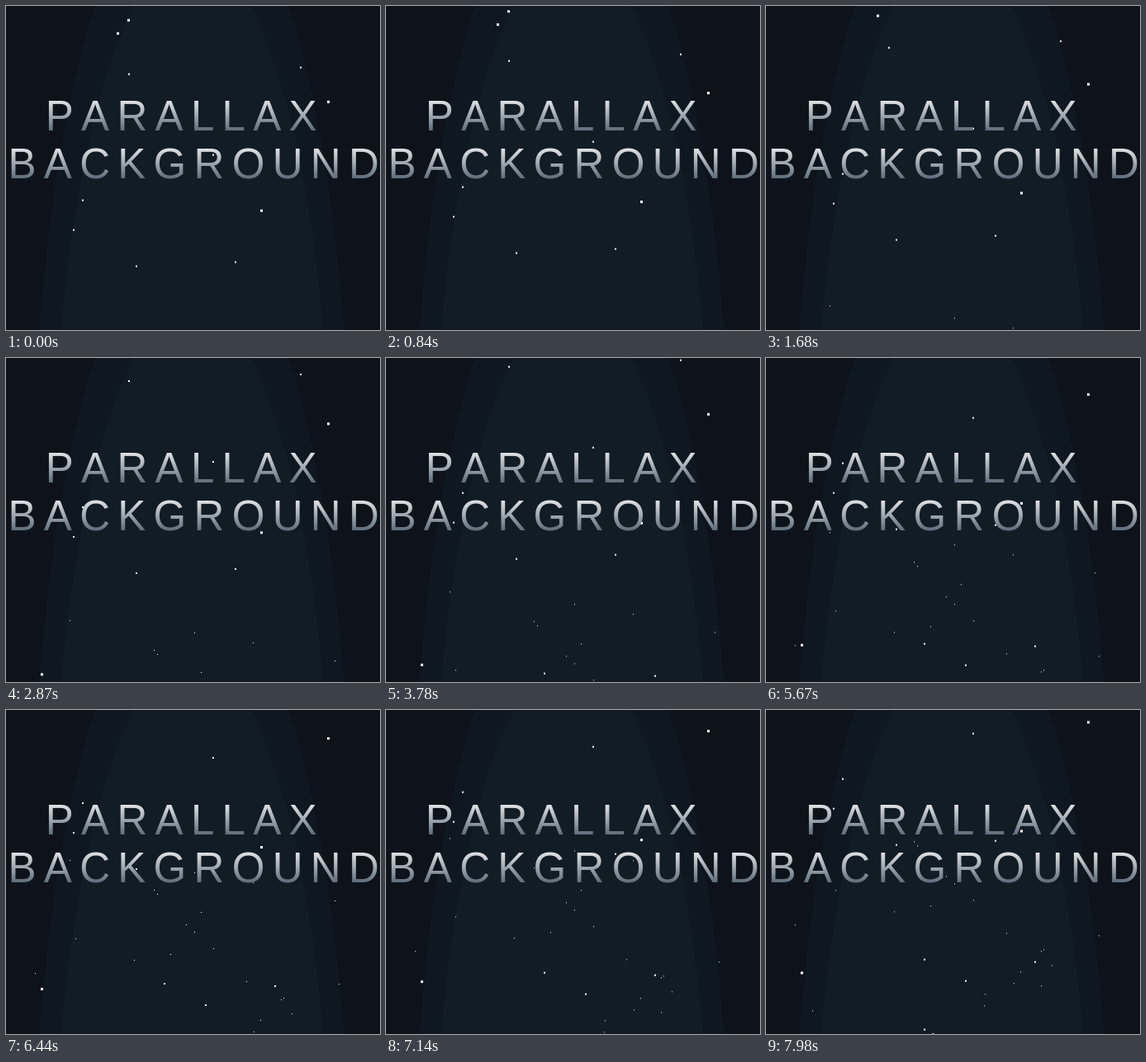
Animation, 453 px wide and 393 px high, one loop 8 s. Source, as an HTML page with a canvas:

```html
<!DOCTYPE html>
<html lang="en">
<head>
<meta charset="utf-8">
<title>Parallax background</title>
<style>
  html, body { margin: 0; width: 100%; height: 100%; overflow: hidden; background: #0e131b; }
  svg, canvas { position: absolute; left: 0; top: 0; width: 453px; height: 393px; }
  text { font: 51px "Liberation Sans", Arial, sans-serif; letter-spacing: 9.3px; font-kerning: none; fill: url(#fade); }
</style>
</head>
<body>
<svg viewBox="0 0 453 393">
  <ellipse cx="225" cy="631" rx="193.3" ry="794.5" fill="#0f1820"/>
  <ellipse cx="225.5" cy="631" rx="169" ry="694.6" fill="#121c25"/>
</svg>
<canvas width="453" height="393"></canvas>
<svg viewBox="0 0 453 393">
  <defs>
    <linearGradient id="fade" gradientUnits="userSpaceOnUse" x1="0" x2="0" y1="-45" y2="11">
      <stop stop-color="#fff"/>
      <stop offset="1" stop-color="#38495a"/>
    </linearGradient>
  </defs>
  <g transform="translate(47.8 151)"><text>PARALLAX</text></g>
  <g transform="translate(2.5 209)"><text>BACKGROUND</text></g>
</svg>
<script>
  const LOOP = 8000, STEP = 70, LEAD = 0.25;
  const ctx = document.querySelector('canvas').getContext('2d');

  function seededRandom(seed) {
    return () => (seed = (seed * 16807) % 2147483647) / 2147483647;
  }

  // Faint stars start below the stage, about one every 10px.
  const random = seededRandom(20117);
  const faint = Array.from({ length: 25 }, (_, i) => [
    11 + Math.floor(random() * 425),
    427 + Math.floor((i + random()) * 10)
  ]);
  const medium = [
    [148, 82], [356, 74], [250, 180], [92, 235], [81, 271], [157, 315],
    [277, 310], [191, 454], [325, 457], [241, 480], [191, 539]
  ];
  const large = [[147, 16], [134, 32], [389, 115], [308, 247], [42, 419], [201, 494]];

  // Bigger stars are farther away: rise per step shrinks with size.
  const layers = [
    { size: 1, rise: 8 / 3, stars: faint },
    { size: 2, rise: 4 / 3, stars: medium },
    { size: 3, rise: 8 / 9, stars: large }
  ];

  function draw(time) {
    const steps = Math.floor((time % LOOP) / STEP) + LEAD;
    ctx.clearRect(0, 0, 453, 393);
    ctx.fillStyle = '#fff';
    for (const { size, rise, stars } of layers) {
      for (const [x, y] of stars) ctx.fillRect(x, y - steps * rise, size, size);
    }
  }

  let start;
  function tick(now) {
    start ??= now;
    draw(now - start);
    requestAnimationFrame(tick);
  }
  draw(0);
  requestAnimationFrame(tick);
</script>
</body>
</html>
```
